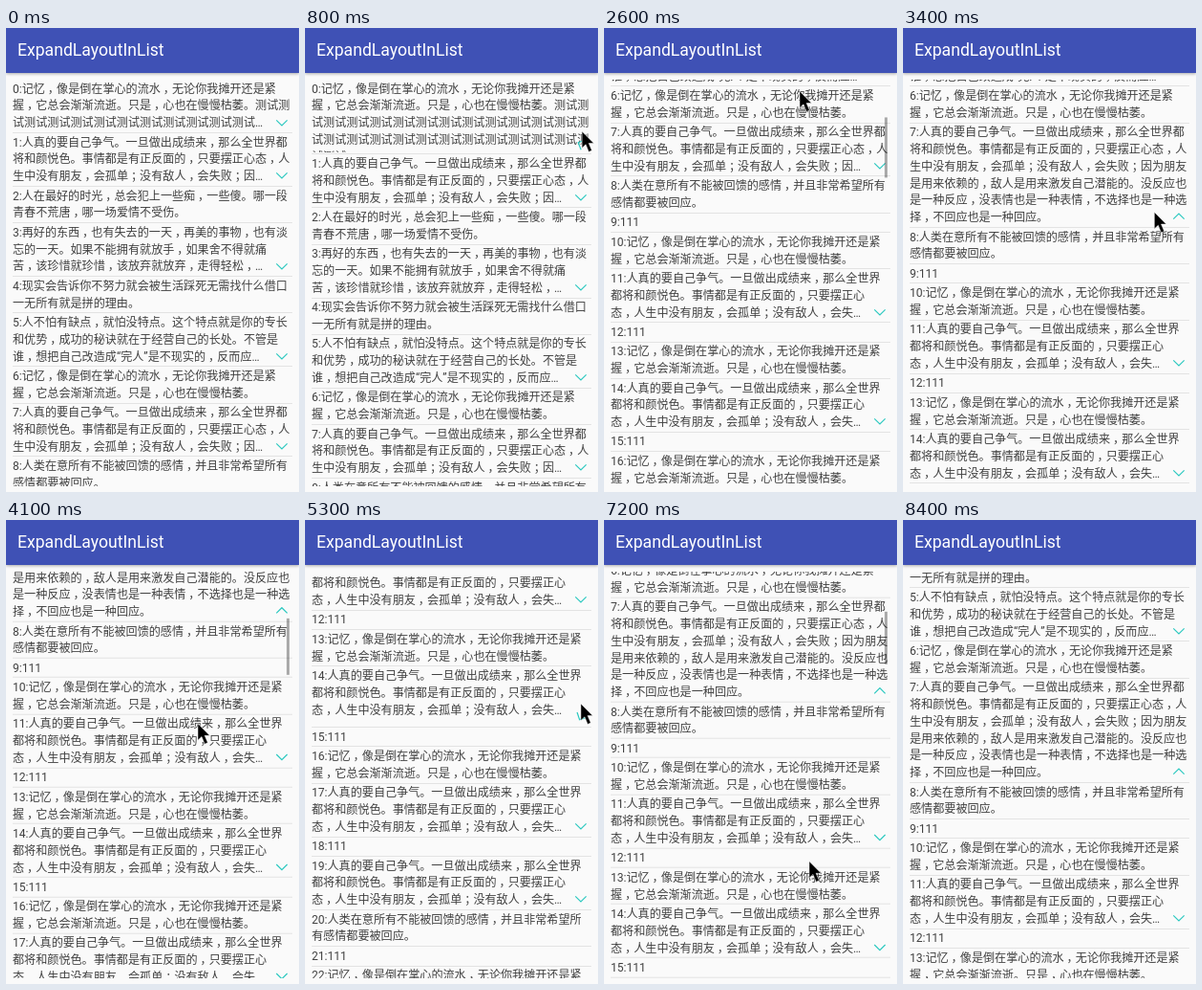
An HTML page for the animation above (8700 ms loop, 307 px wide and 485 px high).

```html
<!DOCTYPE html>
<html lang="zh-CN">
<head>
<meta charset="utf-8">
<title>ExpandLayoutInList</title>
<style>
html, body { margin: 0; width: 100%; height: 100%; overflow: hidden; background: #fafafa; }
#stage { position: relative; width: 307px; height: 485px; overflow: hidden; background: #fafafa; }
header {
  position: absolute; left: 0; top: 0; width: 307px; height: 47px; padding-left: 12px; box-sizing: border-box;
  background: #3f51b5; color: #fff; font: 17.6px/47px Roboto, sans-serif;
  box-shadow: 0 1px 3px rgba(0, 0, 0, .32);
}
#view { position: absolute; left: 7px; top: 54px; width: 293px; height: 425px; overflow: hidden; }
#list {
  font: 12.1px/17.8px Roboto, "Noto Sans CJK SC", "Noto Sans CJK", sans-serif; color: #404040;
  white-space: pre; font-kerning: none; text-spacing-trim: space-all;
}
.item { position: relative; padding-bottom: 2.6px; }
.item::after { content: ""; position: absolute; left: 0; right: 0; bottom: 0; height: 1px; background: #e3e3e3; }
.body { position: relative; overflow: hidden; }
.text { position: relative; top: 1.7px; }
.text i { position: relative; left: .24em; font-style: normal; }
.arrow { position: absolute; left: 275px; bottom: 1.9px; width: 14px; height: 14px; }
svg { display: block; fill: none; overflow: visible; }
.arrow path { stroke: #2cc9c0; stroke-width: 1.2; }
#bar { position: absolute; left: 294px; top: 0; width: 3px; background: rgba(0, 0, 0, .32); }
#cursor { position: absolute; left: 0; top: 0; }
#cursor path { fill: #000; stroke: #fff; stroke-width: .5; }
</style>
</head>
<body>
<div id="stage">
  <header>ExpandLayoutInList</header>
  <div id="view"><div id="list"></div></div>
  <div id="bar"></div>
  <svg id="cursor" width="13" height="22"><path d="M0 0V17.5L4 13.8L7.2 21.5L10.4 20L7.2 12.6H12.5Z"/></svg>
</div>
<script>
const LOOP = 8700, STEP = 100, LINE = 17.8, GAP = 2.6, MAX_LINES = 3, VIEW = 425;
const OPEN_MS = 300, TRAVEL_MS = 600, BAR_TOP = 60, BAR_UNIT = 5.7;

const memory = "记忆，像是倒在掌心的流水，无论你我摊开还是紧握，它总会渐渐流逝。只是，心也在慢慢枯萎。";
const strive = "人真的要自己争气。一旦做出成绩来，那么全世界都将和颜悦色。事情都是有正反面的，只要摆正心态，" +
  "人生中没有朋友，会孤单；没有敌人，会失败；因为朋友是用来依赖的，敌人是用来激发自己潜能的。" +
  "没反应也是一种反应，没表情也是一种表情，不选择也是一种选择，不回应也是一种回应。";
const reply = "人类在意所有不能被回馈的感情，并且非常希望所有感情都要被回应。";
const youth = "人在最好的时光，总会犯上一些痴，一些傻。哪一段青春不荒唐，哪一场爱情不受伤。";
const letGo = "再好的东西，也有失去的一天，再美的事物，也有淡忘的一天。如果不能拥有就放手，如果舍不得就痛" +
  "苦，该珍惜就珍惜，该放弃就放弃，走得轻松，…";
const real = "现实会告诉你不努力就会被生活踩死无需找什么借口一无所有就是拼的理由。";
const flaw = "人不怕有缺点，就怕没特点。这个特点就是你的专长和优势，成功的秘诀就在于经营自己的长处。不管是" +
  "谁，想把自己改造成“完人”是不现实的，反而应…";
const ones = "111";

const texts = [
  memory + "测试".repeat(27), strive, youth, letGo, real, flaw, memory, strive, reply, ones,
  memory, strive, ones, memory, strive, ones, memory, strive, ones, strive, reply, ones, memory, strive, ones
];

// What the pointer does: a tap toggles an item, a drag scrolls by dy.
const gestures = [
  { at: 200, ms: 0, x: 299, y: 88 },
  { at: 300, ms: 325, x: 289, y: 96 },
  { at: 625, ms: 0, x: 289, y: 96, tap: 0 },
  { at: 1600, ms: 150, x: 293, y: 137, tap: 0 },
  { at: 2200, ms: 400, x: 205, y: 359, dy: -293 },
  { at: 3025, ms: 200, x: 289, y: 142, tap: 7 },
  { at: 4000, ms: 466, x: 201, y: 315, dy: -267 },
  { at: 5225, ms: 100, x: 289, y: 192, tap: 14 },
  { at: 6025, ms: 150, x: 293, y: 247, tap: 14 },
  { at: 6500, ms: 1409, x: 215, y: 108, dy: 333 }
];
const SHOW = 200, HIDE = 7800;

const clamp = x => Math.min(1, Math.max(0, x));
const smooth = x => .5 - Math.cos(Math.PI * clamp(x)) / 2;
const slowDown = x => 1 - (1 - clamp(x)) ** 2;
const mix = (a, b, p) => a + (b - a) * p;

const drags = gestures.filter(g => g.dy);
const tapped = [...new Set(gestures.filter(g => "tap" in g).map(g => g.tap))];
const dragged = (g, t) => (g.dy || 0) * slowDown((t - g.at) / (g.ms || 1));
const scrollAt = t => -drags.reduce((sum, g) => sum + dragged(g, t), 0);

function barAlpha(t) {
  return Math.max(...drags.map(g => t < g.at ? 0 : clamp((g.at + g.ms + 450 - t) / 150)));
}

function openness(i, t) {
  let p = 0;
  gestures.filter(g => g.tap === i && t >= g.at).forEach((g, n) => {
    p = mix(p, n % 2 ? 0 : 1, smooth((t - g.at) / OPEN_MS));
  });
  return p;
}

// Follow the current gesture, then travel to the start of the next one.
function pointer(t) {
  const n = Math.max(0, gestures.filter(g => g.at <= t).length - 1);
  const g = gestures[n], next = gestures[n + 1] || g, end = g.at + g.ms;
  const y = g.y + dragged(g, t);
  if (t <= end || next === g) return [g.x, y];
  const p = clamp((t - end) / Math.min(TRAVEL_MS, next.at - end));
  return [mix(g.x, next.x, p), mix(y, next.y, p)];
}

// Split a text into lines; the index prefix takes room on the first one.
function wrap(text, i) {
  const wide = i > 9;
  const first = wide || text.startsWith(memory) ? 22 : 23;
  const second = text === letGo || (text === strive && wide) ? 22 : text === flaw ? 23 : 24;
  const lines = [text.slice(0, first), text.slice(first, first + second)];
  for (let at = first + second; at < text.length; at += 24) lines.push(text.slice(at, at + 24));
  lines[0] = i + ":" + lines[0];
  return lines.filter(Boolean);
}

// Commas and semicolons sit in the middle of their cell.
const markup = lines => lines.join("\n").replace(/[，；]/g, "<i>$&</i>");

const $ = id => document.getElementById(id);
const list = $("list"), bar = $("bar"), cursor = $("cursor");

const items = texts.map((text, i) => {
  const lines = wrap(text, i), count = lines.length;
  const full = markup(lines);
  const brief = count > MAX_LINES ? markup([...lines.slice(0, 2), lines[2].slice(0, 21) + "…"]) : full;
  const el = document.createElement("div");
  el.className = "item";
  el.innerHTML = `<div class="body"><div class="text">${brief}</div></div>`;
  const body = el.firstChild, label = body.firstChild;
  if (count >= MAX_LINES) {
    body.insertAdjacentHTML("beforeend",
      '<svg class="arrow" viewBox="-7 -7 14 14"><path d="M-5.7 -2.7L0 3L5.7 -2.7"/></svg>');
  }
  const height = Math.min(count, MAX_LINES) * LINE;
  body.style.height = height + "px";
  list.append(el);
  return { body, label, arrow: body.lastChild, full, brief, shown: brief, height, extra: count - MAX_LINES };
});

// Item index, with its fraction, at a height in the list.
function indexAt(y) {
  let i = 0;
  for (const { height } of items) {
    if (y < height + GAP) return i + y / (height + GAP);
    y -= height + GAP;
    i++;
  }
  return i;
}

function draw(t) {
  for (const i of tapped) {
    const item = items[i], p = openness(i, t);
    const html = p > .2 ? item.full : item.brief;
    if (item.shown !== html) item.label.innerHTML = item.shown = html;
    item.height = (MAX_LINES + item.extra * p) * LINE;
    item.body.style.height = item.height + "px";
    item.arrow.style.transform = `rotate(${180 * p}deg)`;
  }
  const y = scrollAt(t), first = indexAt(y);
  list.style.transform = `translateY(${-y}px)`;
  bar.style.transform = `translateY(${BAR_TOP + BAR_UNIT * first}px)`;
  bar.style.height = BAR_UNIT * (indexAt(y + VIEW) - first) + "px";
  bar.style.opacity = barAlpha(t);
  const [cx, cy] = pointer(t);
  cursor.style.visibility = t >= SHOW && t < HIDE ? "visible" : "hidden";
  cursor.style.transform = `translate(${cx}px, ${cy}px)`;
}

const begin = performance.now();
function tick() {
  const t = (performance.now() - begin) % LOOP;
  draw(Math.floor(t / STEP) * STEP);
  requestAnimationFrame(tick);
}
tick();
</script>
</body>
</html>
```
